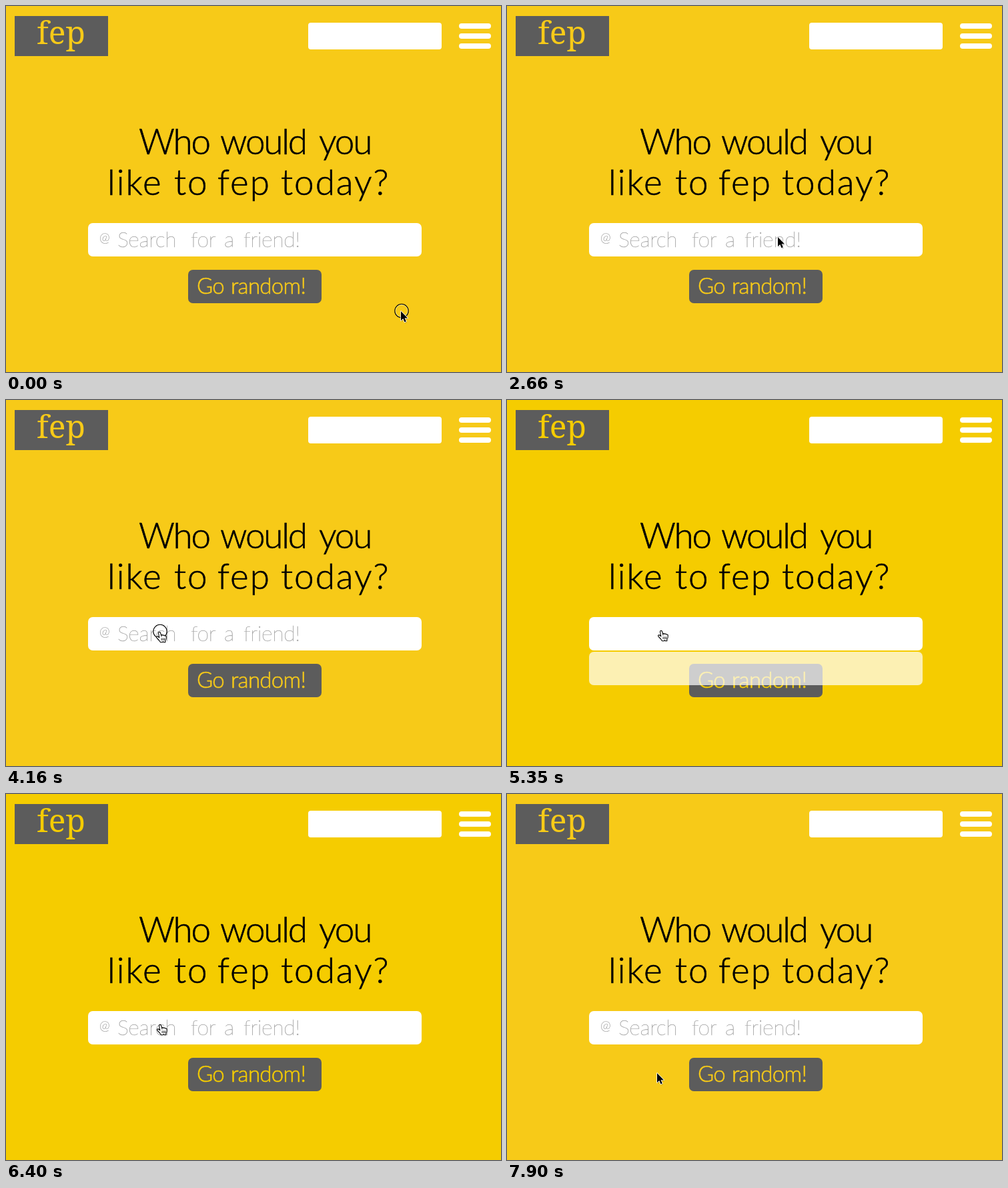
Write an HTML page that moves like this. It is 742x548 px and loops after 8 s.

```html
<!DOCTYPE html>
<html lang="en">
<head>
<meta charset="utf-8">
<title>Friend search</title>
<style>
  html, body { margin: 0; width: 100%; height: 100%; overflow: hidden; }
  svg { display: block; width: 742px; height: 548px; }

  .page, .brand { fill: var(--yellow); }
  .dark { fill: #5c5c5c; }
  .white { fill: #fff; }

  text { font-family: Lato, "Open Sans", sans-serif; font-weight: 300; stroke-width: .6px; }
  .brand { font: 400 48px "Noto Serif", "DejaVu Serif", serif; }
  .headline { font-size: 53px; stroke: #000; }
  .hint { font-size: 32px; font-weight: 100; letter-spacing: -.4px; fill: #a4a4a4; stroke: #a4a4a4; stroke-width: .4px; }
  .at { font-size: 19px; }
  .button { font-size: 33px; letter-spacing: -.7px; fill: var(--yellow); stroke: var(--yellow); }

  /* Everything holds between keyframes; pointer moves add their own steps. */
  svg, #pointer, #hint, #dropdown, #ring, #hand, #arrow { animation: 8s step-end infinite; }
  svg { animation-name: tint; }
  #pointer { animation-name: glide; }
  #hint { animation-name: closed; }
  #dropdown { animation-name: open; }
  #ring { animation-name: click; }
  #hand { animation-name: over; }
  #arrow { animation-name: away; }

  @keyframes tint {
    0%, 78.1%, 94.9% { --yellow: #f7ca18; }
    53.8%, 79.9% { --yellow: #f5cc00; }
    100% { --yellow: #f7ca18; }
  }
  @keyframes closed {
    0%, 79.9%, 100% { visibility: visible; }
    53.8% { visibility: hidden; }
  }
  @keyframes open {
    0%, 79.9%, 100% { visibility: hidden; }
    53.8% { visibility: visible; }
  }
  @keyframes click {
    0%, 51.9%, 78.1% { visibility: visible; }
    1.8%, 53.8%, 79.9%, 100% { visibility: hidden; }
  }
  @keyframes over {
    0%, 94.9%, 100% { visibility: hidden; }
    40.7% { visibility: visible; }
  }
  @keyframes away {
    0%, 94.9%, 100% { visibility: visible; }
    40.7% { visibility: hidden; }
  }
  @keyframes glide {
    0% { translate: 592px 457px; }
    1.8% { translate: 579px 443px; animation-timing-function: steps(7); }
    14.7% { translate: 484px 348px; }
    16.6% { translate: 465px 345px; animation-timing-function: steps(2); }
    20.2% { translate: 428px 340px; }
    25.7% { translate: 425px 340px; animation-timing-function: steps(2); }
    29.4% { translate: 419px 341px; }
    33.2% { translate: 406px 346px; animation-timing-function: steps(2); }
    36.9% { translate: 372px 347px; }
    40.7% { translate: 345px 347px; animation-timing-function: steps(4); }
    48.2% { translate: 235px 347px; }
    51.9% { translate: 230px 347px; animation-timing-function: steps(6); }
    63.1% { translate: 231px 345px; }
    93.1% { translate: 230px 349px; animation-timing-function: steps(3); }
    98.7%, 100% { translate: 225px 418px; }
  }
</style>
</head>
<body>
<svg viewBox="0 0 742 548">
  <rect class="page" width="742" height="548"/>

  <rect class="dark" x="13" y="15" width="140" height="60"/>
  <text class="brand" x="46" y="57">fep</text>
  <rect class="white" x="453" y="25" width="200" height="40" rx="4"/>
  <path d="M683 30H723M683 45H723M683 60H723" stroke="#fff" stroke-width="8" stroke-linecap="round"/>

  <text class="headline" y="222" letter-spacing="-2.2">
    <tspan x="199">Who</tspan> <tspan x="321">would</tspan> <tspan x="469">you</tspan>
  </text>
  <text class="headline" y="283" letter-spacing="2">
    <tspan x="152">like</tspan> <tspan x="252">to</tspan> <tspan x="317">fep</tspan> <tspan x="412">today?</tspan>
  </text>

  <rect class="white" x="123" y="325" width="500" height="50" rx="7"/>
  <g id="hint">
    <text class="hint at" x="140" y="353">@</text>
    <text class="hint" y="361">
      <tspan x="167">Search</tspan> <tspan x="277">for</tspan> <tspan x="327">a</tspan> <tspan x="356">friend!</tspan>
    </text>
  </g>

  <rect class="dark" x="273" y="395" width="200" height="50" rx="7"/>
  <text class="button" y="431"><tspan x="286">Go</tspan> <tspan x="337">random!</tspan></text>
  <rect id="dropdown" class="white" x="123" y="377" width="500" height="50" rx="7" opacity=".7"/>

  <g id="pointer">
    <g id="ring" fill="none">
      <circle cx="1" cy="-.5" r="9.2" stroke="#fff" stroke-opacity=".6"/>
      <circle cx="1" cy="-.5" r="10.2" stroke="#000" stroke-width="1.1"/>
    </g>
    <g id="arrow">
      <path d="M1 2V16L4 13 6.5 18 9 17 7 12H11Z" opacity=".18"/>
      <path d="M0 0V14L3.3 11 5.5 16.3 7.8 15.3 5.6 10.3H10Z" stroke="#fff" stroke-width="1.6" stroke-linejoin="round" paint-order="stroke"/>
    </g>
    <g id="hand" stroke="#000" stroke-width="1.1" stroke-linejoin="round">
      <path fill="#fff" d="M-1.5 2Q-1.5 .2 0 .2Q1.3 .3 1.7 2L2.7 5.5Q4.2 3.8 5.3 5.5Q7 4.4 7.9 6.1Q10.2 5.5 10.3 8Q10.4 11.5 8.8 13.5V15.8H6.5L5.5 14.6 4.3 15.8H1.5L-.8 12.5 -4 9.2Q-5.2 6.7 -2.8 6.7L-.2 8.8Z"/>
      <path fill="none" stroke-width=".9" d="M2.7 5.5L3 7.5M3.2 9.5V13M5.4 9.5V13M7.5 9.5V13"/>
    </g>
  </g>
</svg>
</body>
</html>
```
